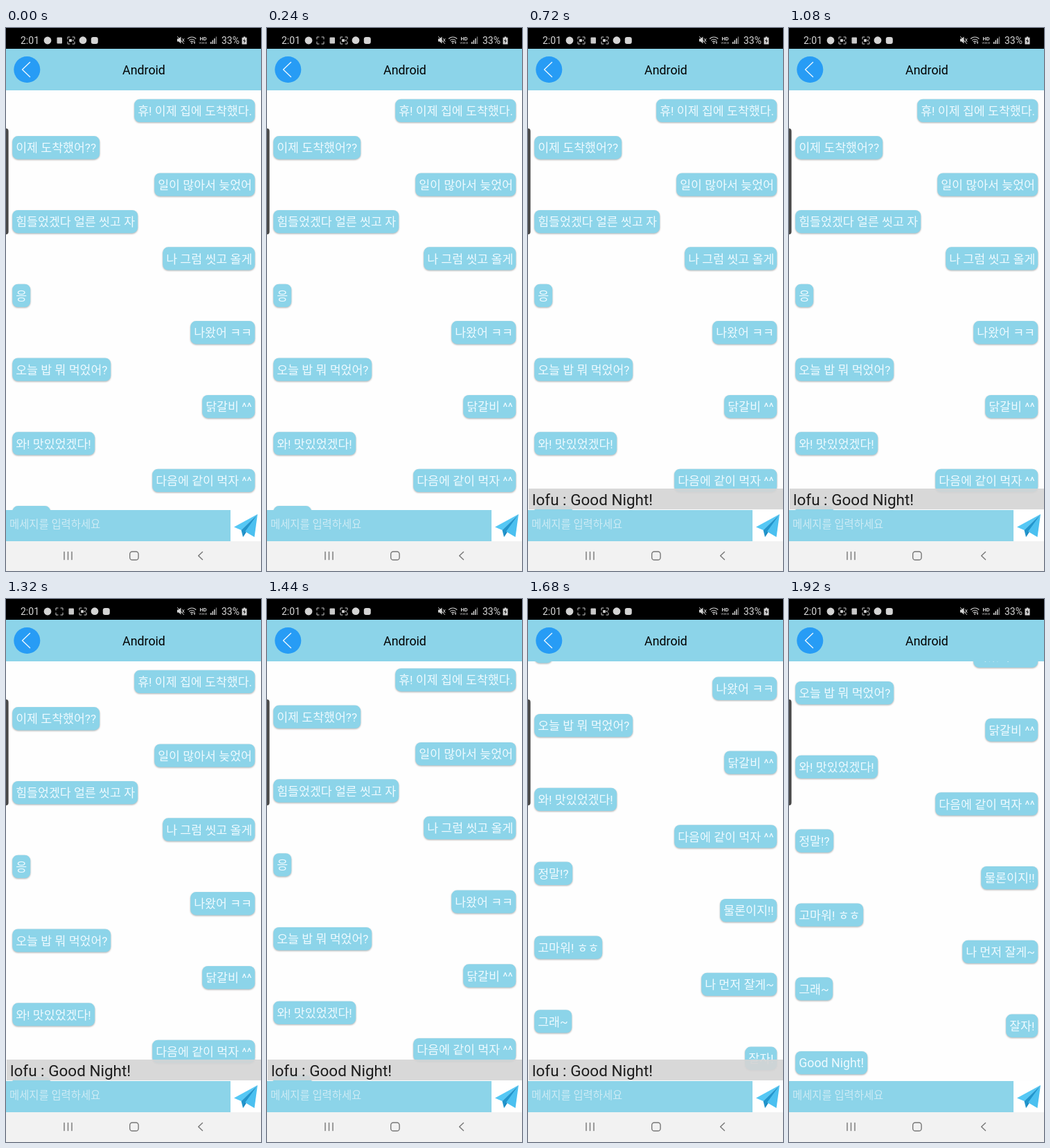
Recreate the animation shown at these times as an HTML page. Size 368x784 px, loop 2040 ms.

```html
<!DOCTYPE html>
<html lang="ko">
<head>
<meta charset="utf-8">
<title>Chat</title>
<style>
  html, body { margin: 0; width: 100%; height: 100%; overflow: hidden; background: #fefefe; }
  svg { display: block; width: 100%; height: 100%; }
  text { font-family: Roboto, "Noto Sans CJK KR", "Noto Sans CJK", sans-serif; white-space: pre; }
  .bubble rect { fill: #8cd4e9; filter: drop-shadow(0 1px 1px rgba(0, 0, 0, .3)); }
  .bubble text { fill: #eefaff; font-size: 17.3px; }
  .line { fill: none; stroke-linecap: round; stroke-linejoin: round; }
</style>
</head>
<body>
<svg viewBox="0 0 368 784">
  <defs>
    <clipPath id="view"><rect y="90" width="368" height="606"/></clipPath>
    <g id="corners" class="line" stroke="#c9c9c9" stroke-width="1">
      <path d="M-5-2v-3h3M2-5h3v3M5 2v3h-3M-2 5h-3v-3"/>
    </g>
    <g id="camera" fill="#c9c9c9">
      <rect x="-3" y="-2" width="4" height="4" rx=".8"/>
      <path d="M1.5 0l2-1.7v3.4z"/>
    </g>
  </defs>
  <rect width="368" height="784" fill="#fefefe"/>

  <g clip-path="url(#view)"><g id="list"></g></g>

  <path d="M0 145q3.6 0 3.6 4v145q0 4-3.6 4z" fill="#484848"/>

  <rect y="30" width="368" height="60" fill="#8cd4e9"/>
  <circle cx="30.3" cy="60" r="19" fill="#279cf5"/>
  <path class="line" d="M34.5 49.5L23.5 60l11 10.5" stroke="#e8f6ff" stroke-width="1.4"/>
  <text x="199" y="67" font-size="17.8" text-anchor="middle">Android</text>

  <rect width="368" height="30" fill="#000"/>
  <g fill="#d4d4d4">
    <text x="21" y="23" font-size="14">2:01</text>
    <text x="311" y="23" font-size="14">33%</text>
    <text x="284.5" y="18" font-size="7.5" font-weight="700" text-anchor="middle">HD</text>
    <text x="284.5" y="22.5" font-size="4.2" text-anchor="middle">VOICE</text>
    <path d="M247 15.5h2.2l3.3-3v10l-3.3-3H247z"/>
    <path class="line" d="M247.5 12.5l9 10M254.5 15.5l2.5 4M257 15.5l-2.5 4" stroke="#d4d4d4"/>
    <path class="line" d="M262.5 15.3q5.7-4.5 11.4 0M264.5 17.6q3.7-2.8 7.4 0M266.3 19.8q1.9-1.3 3.8 0" stroke="#d4d4d4" stroke-width="1.1"/>
    <circle cx="268.2" cy="21.8" r="1"/>
    <path d="M272 18.5l1.3 2h-2.6zM272 23l1.3-2h-2.6z"/>
    <path d="M295 20h1.5v3H295zM297.6 17.5h1.5V23h-1.5zM300.2 15h1.5v8h-1.5z"/>
    <path d="M302.8 12.5h1.4V23h-1.4z" fill="#777"/>
    <path d="M342.7 12.5h2.6v1.3h2.2V23.5h-7V13.8h2.2z"/>
    <path d="M344.6 15l-2.5 4h1.8l-.5 3.2 2.6-4h-1.8z" fill="#111"/>
  </g>
  <circle cx="60" cy="18" r="5.4" fill="#d4d4d4"/>
  <g id="record" transform="translate(77 18)">
    <use href="#corners"/><use id="dot" href="#camera"/>
  </g>
  <g id="icons">
    <rect x="73.5" y="13.5" width="7.5" height="9" rx="1" fill="#c9c9c9"/>
    <g transform="translate(94 18)"><use href="#corners"/><use href="#camera"/></g>
    <circle cx="111" cy="17.7" r="5.4" fill="#d4d4d4"/>
    <rect x="122.8" y="13" width="10" height="10" rx="3.2" fill="#d4d4d4"/>
  </g>

  <rect y="696" width="324" height="45" fill="#8cd4e9"/>
  <text x="5" y="721.8" font-size="15.4" fill="#cdebf5">메세지를 입력하세요</text>
  <rect x="324" y="696" width="44" height="45" fill="#fff"/>
  <path d="M363 702L329 720.5l10.5 4.5z" fill="#55c8f5"/>
  <path d="M363 702l-23.5 23 2.5 10z" fill="#2295cc"/>
  <path d="M363 702l-18 25-3 8z" fill="#1b84ba"/>
  <path d="M363 702l-18 25 13.5 8z" fill="#4bc0f0"/>

  <rect y="741" width="368" height="43" fill="#f2f2f2"/>
  <g class="line" stroke="#777" stroke-width="1.4">
    <path d="M84 756.5v11M89.5 756.5v11M95 756.5v11"/>
    <rect x="178.7" y="756" width="12.4" height="12" rx="3.6"/>
    <path d="M283.5 756.5l-5.8 5.5 5.8 5.5"/>
  </g>

  <g id="banner">
    <rect x="1" y="665" width="367" height="30" fill="#d4d4d4" fill-opacity=".9"/>
    <text x="6" y="689" font-size="22.5" fill="#1c1c1c">lofu : Good Night!</text>
  </g>
</svg>
<script>
  const LOOP = 2040, STEP = 120, ROW = 53.4, TOP = 102.7, SCROLL = 357.5;
  const $ = id => document.getElementById(id);

  // Text, bubble width and optional font size; sides alternate, right first.
  const messages = [
    ['휴! 이제 집에 도착했다.', 174], ['이제 도착했어??', 126],
    ['일이 많아서 늦었어', 145], ['힘들었겠다 얼른 씻고 자', 181],
    ['나 그럼 씻고 올게', 133], ['응', 26],
    ['나왔어 ㅋㅋ', 93], ['오늘 밥 뭐 먹었어?', 142],
    ['닭갈비 ^^', 76], ['와! 맛있었겠다!', 119],
    ['다음에 같이 먹자 ^^', 148], ['정말!?', 55],
    ['물론이지!!', 82], ['고마워! ㅎㅎ', 98],
    ['나 먼저 잘게~', 109], ['그래~', 54],
    ['잘자!', 46], ['Good Night!', 104, 17.8]
  ];

  function add(parent, tag, attrs) {
    const node = document.createElementNS(parent.namespaceURI, tag);
    for (const key in attrs) node.setAttribute(key, attrs[key]);
    return parent.appendChild(node);
  }

  messages.forEach(([text, width, size], i) => {
    const x = i % 2 ? 9.2 : 359.2 - width, y = TOP + i * ROW;
    const bubble = add($('list'), 'g', { class: 'bubble' });
    add(bubble, 'rect', { x, y, width, height: 33.3, rx: 8 });
    const label = add(bubble, 'text', { x: x + 5, y: y + 23.3 });
    label.textContent = text;
    if (size) label.style.fontSize = size + 'px';
  });

  const show = (id, on) => $(id).setAttribute('visibility', on ? 'visible' : 'hidden');
  const move = (id, x, y) => $(id).setAttribute('transform', `translate(${x} ${y})`);

  function draw(ms) {
    const t = Math.floor(ms % LOOP / STEP) * STEP;
    const recording = t >= 120;
    show('record', recording);
    show('dot', recording && (t >= 600 && t < 1200 || t >= 1760));
    move('icons', recording ? 17 : 0, 0);

    const p = Math.min(1, Math.max(0, (t - 1438.6) / 361.4));
    move('list', 0, -SCROLL * (1 - (1 - p) ** 1.84));
    show('banner', t >= 720 && t < 1800);
  }

  const start = performance.now();
  function tick() {
    draw(performance.now() - start);
    requestAnimationFrame(tick);
  }
  tick();
</script>
</body>
</html>
```
